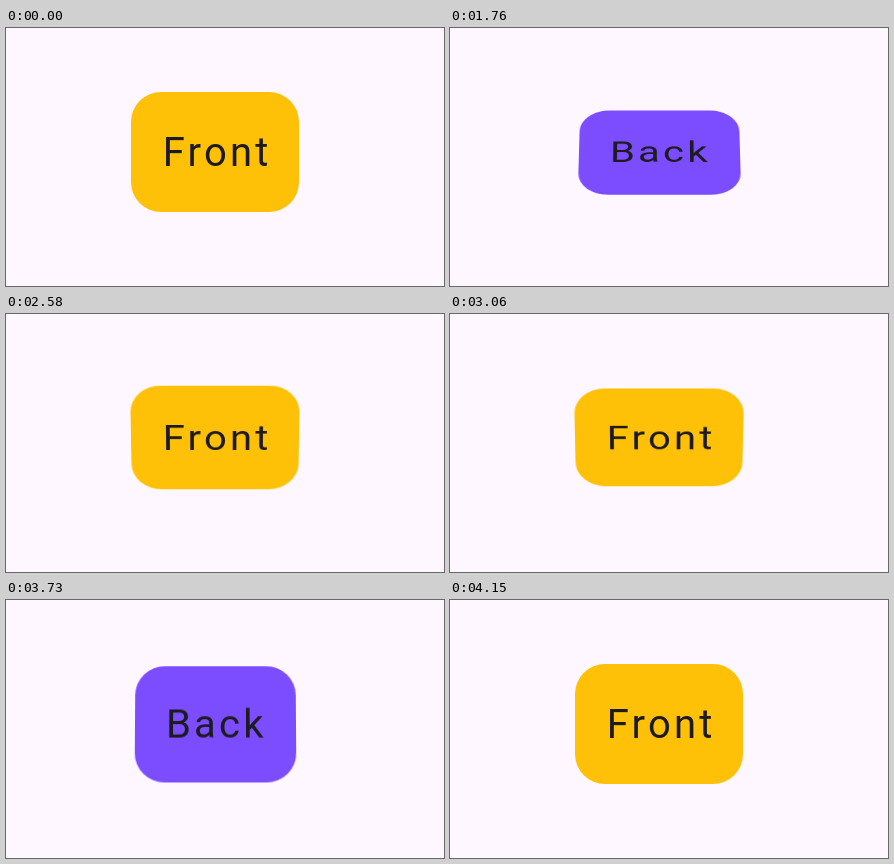
These frames come from a looping animation (438 by 258 pixels, 4180 ms). An HTML page:

```html
<!DOCTYPE html>
<html lang="en">
<head>
<meta charset="utf-8">
<title>Flip card</title>
<style>
html, body {
  margin: 0;
  width: 100%;
  height: 100%;
  overflow: hidden;
  background: #fef7ff;
}
.stage {
  position: relative;
  width: 438px;
  height: 258px;
  perspective: 2800px;
  perspective-origin: 209.2px 124px;
}
.card {
  position: absolute;
  top: 64px;
  height: 120px;
  box-sizing: border-box;
  border-radius: 30px;
  color: #1d1b20;
  font: 40px/122px Roboto, sans-serif;
  letter-spacing: 3.2px;
  white-space: nowrap;
  animation: 4180ms linear infinite;
}
.front {
  left: 125.2px;
  width: 168px;
  padding-left: 31.8px;
  background: #ffc107;
  animation-name: front;
}
.back {
  left: 129px;
  width: 160.6px;
  padding-left: 31px;
  background: #7c4dff;
  animation-name: back;
}
@keyframes front {
  0%, 64.856%, 99.211%, 100% { transform: rotateX(0deg); }
  34.115%, 69.809% { transform: rotateX(0deg); animation-timing-function: ease-in; }
  40.096%, 75.789% { transform: rotateX(-90deg); }
  58.876%, 93.23% { transform: rotateX(-90deg); animation-timing-function: ease-out; }
}
@keyframes back {
  0%, 58.876%, 93.23%, 100% { transform: rotateX(90deg); }
  40.096%, 75.789% { transform: rotateX(90deg); animation-timing-function: ease-out; }
  46.077%, 81.77% { transform: rotateX(0deg); }
  52.895%, 87.249% { transform: rotateX(0deg); animation-timing-function: ease-in; }
}
</style>
</head>
<body>
<div class="stage">
  <div class="card front">Front</div>
  <div class="card back">Back</div>
</div>
</body>
</html>
```
